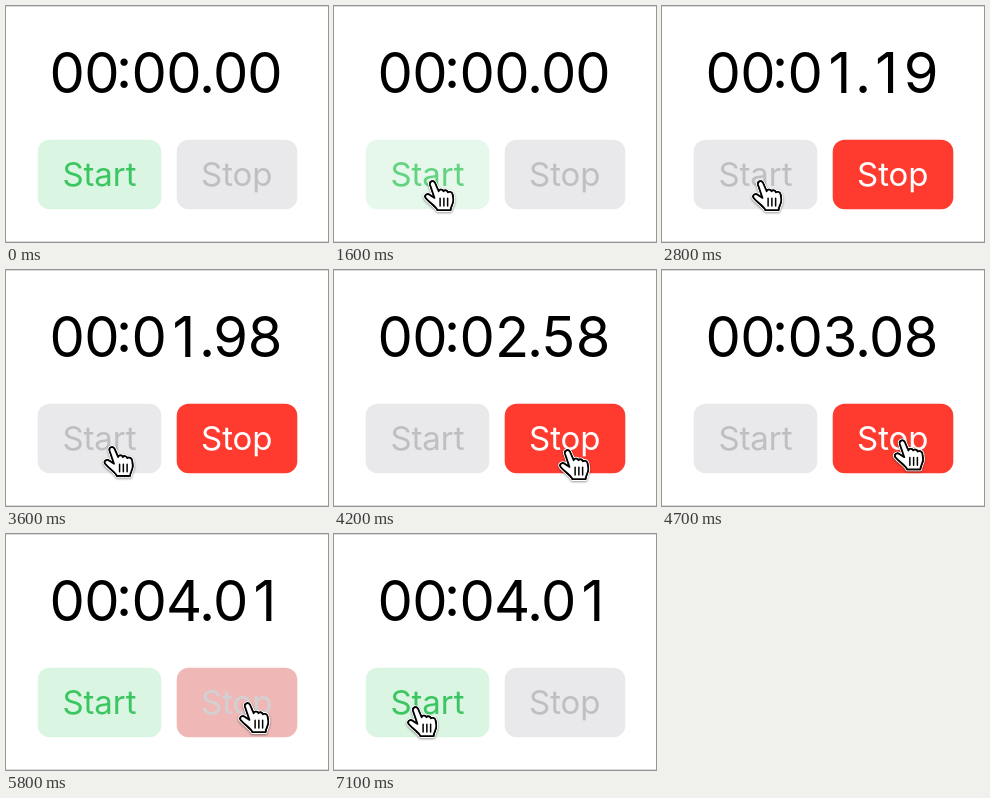
Recreate the animation shown at these times as an HTML page. Size 322x236 px, loop 8000 ms.

```html
<!DOCTYPE html>
<html lang="en">
<head>
<meta charset="utf-8">
<title>Stopwatch</title>
<style>
  html, body { margin: 0; width: 100%; height: 100%; overflow: hidden; background: #fff; }
  svg { display: block; width: 322px; height: 236px; }
  text {
    font-family: Inter, "Liberation Sans", sans-serif;
    font-feature-settings: "calt" 0;
    text-anchor: middle;
  }
  #clock { font-size: 56px; }
  .label { font-size: 33px; letter-spacing: -.1px; }
  #cursor { filter: drop-shadow(0 1.5px 1.2px rgba(0, 0, 0, .4)); }
</style>
</head>
<body>
<svg viewBox="0 0 322 236">
  <rect width="322" height="236" fill="#fff"/>
  <path d="M0 .5H322M0 235.5H322" stroke="#d9d9d9"/>
  <text id="clock" y="86.5" x="61.2 96 118 143.2 178 201 224.7 259" dy="0 0 -5 5">00:00.00</text>
  <g id="start">
    <rect x="31.7" y="133.7" width="123.6" height="69.6" rx="12"/>
    <text class="label" x="93.4" y="179.7">Start</text>
  </g>
  <g id="stop">
    <rect x="170.7" y="133.7" width="120.6" height="69.6" rx="12"/>
    <text class="label" x="230.7" y="179.7">Stop</text>
  </g>
  <circle id="ripple" r="62.5" fill="#808080" fill-opacity=".25"/>
  <g id="cursor" stroke-linejoin="round" stroke-linecap="round">
    <g id="hand" fill="#fff" stroke="#000" stroke-width="1.8" transform="translate(0 -.5) scale(.94)">
      <path id="palm" d="M-4.2 4.5C-5 .8-.8-.6 1 2.4L5 11.5C5.6 9.2 9 9 10 11.5C11 9.8 14 10.2 14.7 12.6C16.3 11.4 19.3 12.2 19.8 15L20.5 20.5C20.7 25 17.8 27 17.6 31.5H3.6C2.6 27.5-4.5 24-8.8 18.6C-10.8 15.5-7 13.2-4.4 15.4L.6 18.6Z" stroke="#fff" stroke-width="4"/>
      <use href="#outline"/>
      <path id="outline" d="M-4.2 4.5C-5 .8-.8-.6 1 2.4L5 11.5C5.6 9.2 9 9 10 11.5C11 9.8 14 10.2 14.7 12.6C16.3 11.4 19.3 12.2 19.8 15L20.5 20.5C20.7 25 17.8 27 17.6 31.5H3.6C2.6 27.5-4.5 24-8.8 18.6C-10.8 15.5-7 13.2-4.4 15.4L.6 18.6Z"/>
      <path d="M6.5 19V27M10.5 19V27M14.5 19V27" stroke-width="1.6"/>
    </g>
    <path id="arrow" d="M0 0V25L5.6 19.8L9.6 29L13.8 27.2L9.9 18.2H17.6Z" fill="#000" stroke="#fff" stroke-width="1.6"/>
  </g>
</svg>
<script>
  const LOOP = 8000, STEP = 100;
  const $ = id => document.getElementById(id);

  // time, x, y, downward bow on the way there
  const path = [
    [0, 290, -40], [100, 188, 75], [200, 96, 140], [300, 60, 260],
    [500, 114, 250], [600, 112, 228], [1200, 100, 175],
    [3500, 100, 175], [4200, 235, 180, 9], [4400, 235, 177],
    [4800, 243, 169], [6600, 243, 169], [7100, 83, 173], [LOOP, 83, 173]
  ];

  const looks = {
    green: ['#daf6e2', '#3cc661'],
    greenDown: ['#e5f8eb', '#64d381'],
    red: ['#ff3b30', '#ffffff'],
    redDown: ['#ff6c64', '#ffffff'],
    grey: ['#e9e9eb', '#bfbfc3']
  };

  const lerp = (a, b, k) => a + (b - a) * k;
  const channels = hex => [1, 3, 5].map(i => parseInt(hex.slice(i, i + 2), 16));

  function blend(a, b, k) {
    const to = channels(b);
    return `rgb(${channels(a).map((v, i) => Math.round(lerp(v, to[i], k)))})`;
  }

  function paint(id, from, to = from, k = 0) {
    const [bg, ink] = looks[from].map((c, i) => blend(c, looks[to][i], k));
    $(id).children[0].setAttribute('fill', bg);
    $(id).children[1].setAttribute('fill', ink);
  }

  function pointer(t) {
    const i = path.findIndex(p => p[0] > t);
    const [t0, x0, y0] = path[i - 1], [t1, x1, y1, bow = 0] = path[i];
    const k = (t - t0) / (t1 - t0), e = k * k * (3 - 2 * k);
    return [lerp(x0, x1, e), lerp(y0, y1, e) + bow * Math.sin(Math.PI * e)];
  }

  function clock(t) {
    if (t < 1800) return '00:00.00';
    const cs = Math.min(401, Math.floor(119.05 + (t - 2800) * .0998));
    const two = n => String(n).padStart(2, '0');
    return `00:${two(Math.floor(cs / 100))}.${two(cs % 100)}`;
  }

  // share of the fade done after a button is released
  const fade = (t, release) => 1 - (1 - Math.min(1, (t - release) / 375)) ** 2;

  function buttons(t) {
    if (t < 1600) paint('start', 'green');
    else if (t < 1800) paint('start', 'greenDown');
    else if (t < 5700) paint('start', 'green', 'grey', fade(t, 1625));
    else paint('start', 'green');

    if (t < 1800) paint('stop', 'grey');
    else if (t < 5600) paint('stop', 'red');
    else if (t < 5700) paint('stop', 'redDown');
    else paint('stop', 'red', 'grey', fade(t, 5625));
  }

  function draw(t) {
    const [x, y] = pointer(t);
    const over = y > 134 && y < 203 && (x > 32 && x < 155 || x > 171 && x < 291);
    $('cursor').setAttribute('transform', `translate(${x} ${y})`);
    $('hand').style.display = over ? '' : 'none';
    $('arrow').style.display = over ? 'none' : '';

    const ripple = $('ripple');
    ripple.style.display = t === 1500 || t === 5500 ? '' : 'none';
    ripple.setAttribute('cx', x);
    ripple.setAttribute('cy', y);

    $('clock').textContent = clock(t);
    buttons(t);
  }

  const begin = performance.now();
  function tick() {
    const t = (performance.now() - begin) % LOOP;
    draw(Math.floor(t / STEP) * STEP);
    requestAnimationFrame(tick);
  }
  tick();
</script>
</body>
</html>
```
